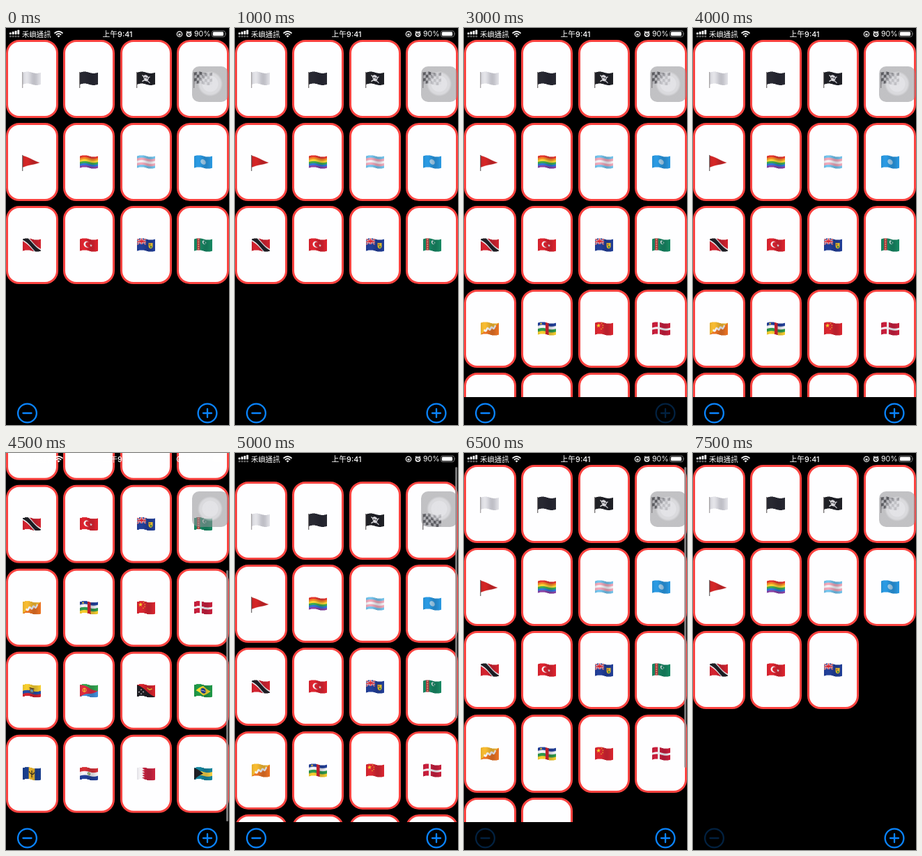
These frames come from a looping animation (320x569 px, 8 s). An HTML page with a canvas:

```html
<!DOCTYPE html>
<html lang="zh-Hant">
<head>
<meta charset="utf-8">
<title>Flag grid</title>
<style>
html, body { margin: 0; width: 100%; height: 100%; overflow: hidden; background: #000; }
#stage { position: relative; width: 320px; height: 569px; overflow: hidden; background: #000; }
#view { position: absolute; inset: 0 0 40px 0; overflow: hidden; }
.card {
  position: absolute; box-sizing: border-box; width: 74.6px; height: 112px;
  border: 3px solid #fb4340; border-radius: 19px; background: #fefeff;
}
.card canvas { position: absolute; left: 19.3px; top: 40px; width: 30px; height: 26px; }
#bar { position: absolute; left: 315.5px; width: 3px; border-radius: 2px; background: rgba(150, 150, 152, .8); }
#status, #buttons { position: absolute; left: 0; top: 0; }
text { font-family: Inter, "Noto Sans CJK TC", "Noto Sans CJK", sans-serif; }
#touch {
  position: absolute; left: 267px; top: 55px; width: 52px; height: 51px; border-radius: 10px;
  background: radial-gradient(circle at 26px 25px, rgba(222, 222, 226, .85) 11px,
    rgba(206, 206, 210, .75) 12px 15px, rgba(146, 146, 150, .56) 18px);
}
</style>
</head>
<body>
<div id="stage">
  <div id="view"><div id="grid"></div></div>
  <div id="bar"></div>
  <svg id="status" width="320" height="18" fill="#fff">
    <g id="signal"></g>
    <text x="23" y="12.6" font-size="10.4">禾嶼通訊</text>
    <path d="M69.5 7.6Q75.5 2 81.5 7.6M71.9 9.8Q75.5 6.6 79.1 9.8" fill="none" stroke="#fff" stroke-width="1.7"/>
    <path d="M73.5 11.2Q75.5 9.6 77.5 11.2L75.5 13.4Z"/>
    <text x="160" y="12.5" font-size="10.8" font-weight="500" text-anchor="middle">上午9:41</text>
    <g fill="none" stroke="#fff" stroke-width="1.1">
      <circle cx="249" cy="8.8" r="3.7"/>
      <circle cx="262.5" cy="9" r="3.1" stroke-width="1.5"/>
      <path d="M258.8 6.2L260.6 4.6M266.2 6.2L264.4 4.6M262.5 7.3V9.2H264"/>
      <rect x="295.5" y="4.1" width="19" height="8.6" rx="2.6" stroke-opacity=".5" stroke-width=".9"/>
    </g>
    <path d="M247.5 8H250.5V10.7H247.5Z"/>
    <rect x="296.9" y="5.5" width="15.2" height="5.8" rx="1.4"/>
    <path d="M315.6 6.8Q317.2 8.4 315.6 10Z" opacity=".5"/>
    <text x="270" y="12.4" font-size="10.6">90%</text>
  </svg>
  <svg id="buttons" width="320" height="569" fill="none" stroke="#0a84ff" stroke-width="2.3" stroke-linecap="round">
    <g id="minus"><circle cx="30.5" cy="552" r="13.4"/><path d="M24.5 552H36.5"/></g>
    <g id="plus"><circle cx="289" cy="552" r="13.4"/><path d="M283 552H295M289 546V558"/></g>
  </svg>
  <div id="touch"></div>
</div>
<script>
const W = 52, H = 34, CX = W / 2, CY = H / 2, TAU = 2 * Math.PI;
const RED = '#d5232f', GREEN = '#1f8a4c', BLUE = '#22409a', GOLD = '#f8cf2e', WHITE = '#f6f5f8', BLACK = '#1f1f24';
const $ = id => document.getElementById(id);
let g;

// Flag drawing helpers
function rect(c, x = 0, y = 0, w = W, h = H) { g.fillStyle = c; g.fillRect(x, y, w, h); }
function disc(c, x, y, r) { g.fillStyle = c; g.beginPath(); g.arc(x, y, r, 0, TAU); g.fill(); }
function poly(c, ...p) {
  g.fillStyle = c; g.beginPath();
  for (let i = 0; i < p.length; i += 2) g.lineTo(p[i], p[i + 1]);
  g.fill();
}
function line(c, w, ...p) {
  g.strokeStyle = c; g.lineWidth = w; g.beginPath();
  for (let i = 0; i < p.length; i += 2) g.lineTo(p[i], p[i + 1]);
  g.stroke();
}
function star(c, x, y, r) {
  const p = [];
  for (let i = 0; i < 10; i++) {
    const a = i * TAU / 10, d = i % 2 ? r * .42 : r;
    p.push(x + d * Math.sin(a), y - d * Math.cos(a));
  }
  poly(c, ...p);
}
function bands(...colors) {
  const h = H / colors.length;
  colors.forEach((c, i) => rect(c, 0, i * h, W, h + .5));
}
function hoist(c, tip) { poly(c, 0, 0, tip, CY, 0, H); }
function moon(c, back, x, y, r) { disc(c, x, y, r); disc(back, x + r * .35, y, r * .8); }
function ring(n, x, y, r, draw, from = 0, sweep = TAU) {
  for (let i = 0; i < n; i++) {
    const a = from + i * sweep / n;
    draw(x + r * Math.cos(a), y + r * Math.sin(a));
  }
}
function squiggle(c, w, rise) {
  const p = [];
  for (let x = 9; x < W - 8; x++) p.push(x, CY - (x - CX) * rise + 3 * Math.sin(x * .55));
  line(c, w, ...p);
}
function saltire(c, w, x, y, dx, dy) {
  line(c, w, x - dx, y - dy, x + dx, y + dy);
  line(c, w, x - dx, y + dy, x + dx, y - dy);
}
function jack() {
  rect(BLUE);
  const x = CX / 2, y = CY / 2;
  for (const [c, w] of [[WHITE, 2], [RED, 1]]) {
    saltire(c, w * 1.8, x, y, x, y);
    line(c, w * 3, x, 0, x, CY);
    line(c, w * 3, 0, y, CX, y);
  }
  rect(BLUE, CX, 0); rect(BLUE, 0, CY);
}

const flags = [
  () => rect('#e4e4e9'),
  () => rect('#282932'),
  () => {
    rect('#202126');
    saltire(WHITE, 2.6, CX, 19, 11, 9);
    disc(WHITE, CX, 15, 7.5); rect(WHITE, 22, 19, 8, 6);
    for (const s of [-3, 3]) disc(BLACK, CX + s, 15.5, 2);
  },
  () => {
    rect('#e6e6ea');
    for (let r = 0; r < 4; r++)
      for (let c = r % 2; c < 7; c += 2) rect('#191a20', c * W / 7, r * H / 4, W / 7, H / 4);
  },
  () => poly('#d52626', 0, 0, 49, 20, 0, H),
  () => bands('#e8392f', '#f78e24', '#fbd934', '#3cae52', '#2c78dc', '#8a43a8'),
  () => bands('#76c6ee', '#f3a9ba', WHITE, '#f3a9ba', '#76c6ee'),
  () => { rect('#2a9be4'); disc('#a8d6f2', CX, CY, 7.5); },
  () => {
    rect(RED);
    line(WHITE, 17, -4, -9, W + 4, H + 9);
    line(BLACK, 11.5, -4, -9, W + 4, H + 9);
  },
  () => { rect('#e0242f'); moon(WHITE, '#e0242f', 20, CY, 9); star(WHITE, 32, CY, 4.5); },
  () => {
    jack();
    rect(GOLD, 33, 9, 12, 10); disc(GOLD, 39, 19, 6);
    disc('#b8583f', 37, 14, 2); disc(GREEN, 40, 20, 2.4);
  },
  () => {
    rect('#178a63'); rect('#a8343c', 8, 0, 9);
    for (let y = 4; y < H; y += 6.5) disc('#e2a378', 12.5, y, 2.1);
    moon(WHITE, '#178a63', 29, 9, 5.5);
    star(WHITE, 33, 9, 2.4);
  },
  () => { rect('#ee7423'); poly('#f8bc30', 0, 0, W, 0, 0, H); squiggle(WHITE, 5, .5); },
  () => {
    bands(BLUE, WHITE, '#2f9a4c', GOLD);
    rect(RED, 22, 0, 9); star(GOLD, 9, 4.5, 4);
  },
  () => {
    rect('#dc2630'); star(GOLD, 10, 10, 6.5);
    ring(4, 13, 11, 10, (x, y) => star(GOLD, x, y, 2.3), -.9, 2.6);
  },
  () => { rect('#cb1f3c'); rect(WHITE, 16, 0, 6); rect(WHITE, 0, 14, W, 6); },
  () => {
    bands(GOLD, GOLD, '#2450a8', RED);
    disc('#80603a', CX, CY, 6.5); disc('#6ea7c8', CX, CY, 4); rect('#4c3b30', 19, 9, 14, 2.5);
  },
  () => {
    bands('#33a84f', '#4291dc'); hoist('#e02a40', W);
    disc(GOLD, 13, CY, 6); disc('#e02a40', 13, CY, 4); rect(GOLD, 12, 12, 2, 10);
  },
  () => {
    rect(BLACK); poly('#d8232c', 0, 0, W, 0, W, H);
    line(GOLD, 3, 29, 8, 36, 12, 43, 9);
    ring(4, 12, 22, 6, (x, y) => star(WHITE, x, y, 2.6));
  },
  () => {
    rect('#1f9a48'); poly('#fadb30', 5, CY, CX, 3, W - 5, CY, CX, H - 3);
    disc(BLUE, CX, CY, 7.5); rect(WHITE, 19.5, 16, 13, 1.6);
  },
  () => {
    rect('#1a3f8e'); rect('#f9c22f', W / 3, 0, W / 3);
    line(BLACK, 2.2, CX, 8, CX, 28);
    g.beginPath(); g.arc(CX, 11, 7, 0, Math.PI); g.stroke();
  },
  () => { bands('#d92f36', WHITE, BLUE); disc('#5b8d52', CX, CY, 4.2); disc('#e9dc9b', CX, CY, 2.3); },
  () => {
    rect(WHITE); rect('#cf2440', 22);
    for (let i = 0; i < 5; i++) {
      const h = H / 5;
      poly('#cf2440', 22.5, i * h, 14.5, (i + .5) * h, 22.5, (i + 1) * h);
    }
  },
  () => { bands('#15879f', '#fbd445', '#15879f'); hoist(BLACK, CX); }
];

function canvas(width, height) {
  return Object.assign(document.createElement('canvas'), { width, height });
}

// Paints a flat flag, then bends and shades it column by column.
function wave(index) {
  const flat = canvas(W, H);
  g = flat.getContext('2d');
  flags[index]();
  g.globalCompositeOperation = 'source-atop';
  for (let x = 0; x < W; x++)
    rect(`rgba(0, 0, 20, ${.08 - .08 * Math.sin(x / W * TAU * 1.2)})`, x, 0, 1);

  const out = canvas(60, 52), o = out.getContext('2d');
  const pole = index < 5, amp = index === 4 ? .8 : 2.3, top = pole ? 7.5 : 9;
  for (let x = 0; x < W; x++)
    o.drawImage(flat, x, 0, 1, H, x + 4, top - amp * Math.sin(x / W * TAU), 1, H);
  if (pole) { o.fillStyle = index ? '#4b4647' : '#8d8a8c'; o.fillRect(2.5, 6, 2, 46); }
  return out;
}

const COLS = 4, PITCH = 119.2;
const cards = flags.map((_, i) => {
  const card = document.createElement('div');
  card.className = 'card';
  card.style.left = (i % COLS) * 81.8 + 'px';
  card.style.top = 17 + Math.floor(i / COLS) * PITCH + 'px';
  card.append(wave(i));
  $('grid').append(card);
  return card;
});

for (let i = 0; i < 4; i++) {
  const x = 5 + i * 3.8, h = 2.8 + i * 1.2;
  $('signal').innerHTML += `<rect x="${x}" y="${9.2 - h}" width="2.8" height="${h}" rx=".6"/>`
    + `<rect x="${x}" y="10.8" width="2.8" height="2.4" rx=".6" opacity=".4"/>`;
}

// All times in seconds; the screen refreshes twice a second.
const LOOP = 8, STEP = .5, TAP_RATE = 6.8, FIRST = 12;
const ADD_AT = 1.294, REMOVE_AT = 5.574, DRAG_AT = 4.5, BOUNCE_AT = 5, TRACK = 509;

// Rapid taps from a start time: how many so far, and how dim the button is.
function taps(t, from, limit) {
  const n = Math.max(0, (t - from) * TAP_RATE);
  const held = n > 0 && n < limit;
  return { n: Math.min(limit, Math.floor(n)), opacity: held ? .25 + .75 * Math.max(0, n % 1 - .6) / .4 : 1 };
}

// Pulled to the end, thrown back, then a damped bounce at the top.
function scrollAt(t, content) {
  if (t < DRAG_AT) return 0;
  if (t < BOUNCE_AT) return content - TRACK - 2;
  const d = 11 * (t - BOUNCE_AT);
  return -24 * (1 + d) * Math.exp(-d);
}

function draw(t) {
  const add = taps(t, ADD_AT, flags.length - FIRST);
  const cut = taps(t, REMOVE_AT, flags.length);
  const count = FIRST + add.n - cut.n;
  const rows = Math.ceil(count / COLS), content = rows * PITCH + 5;
  const scroll = scrollAt(t, content);
  cards.forEach((c, i) => { c.style.display = i < count ? '' : 'none'; });
  $('grid').style.transform = `translateY(${-scroll}px)`;
  $('plus').style.opacity = add.opacity;
  $('minus').style.opacity = cut.opacity;
  const bar = $('bar').style;
  bar.display = t >= DRAG_AT && content > TRACK ? '' : 'none';
  bar.height = TRACK * TRACK / content + 'px';
  bar.top = 20 + Math.max(0, scroll) * TRACK / content + 'px';
}

const start = performance.now();
function tick() {
  const t = (performance.now() - start) / 1000 % LOOP;
  draw(Math.floor(t / STEP) * STEP);
  requestAnimationFrame(tick);
}
tick();
</script>
</body>
</html>
```
